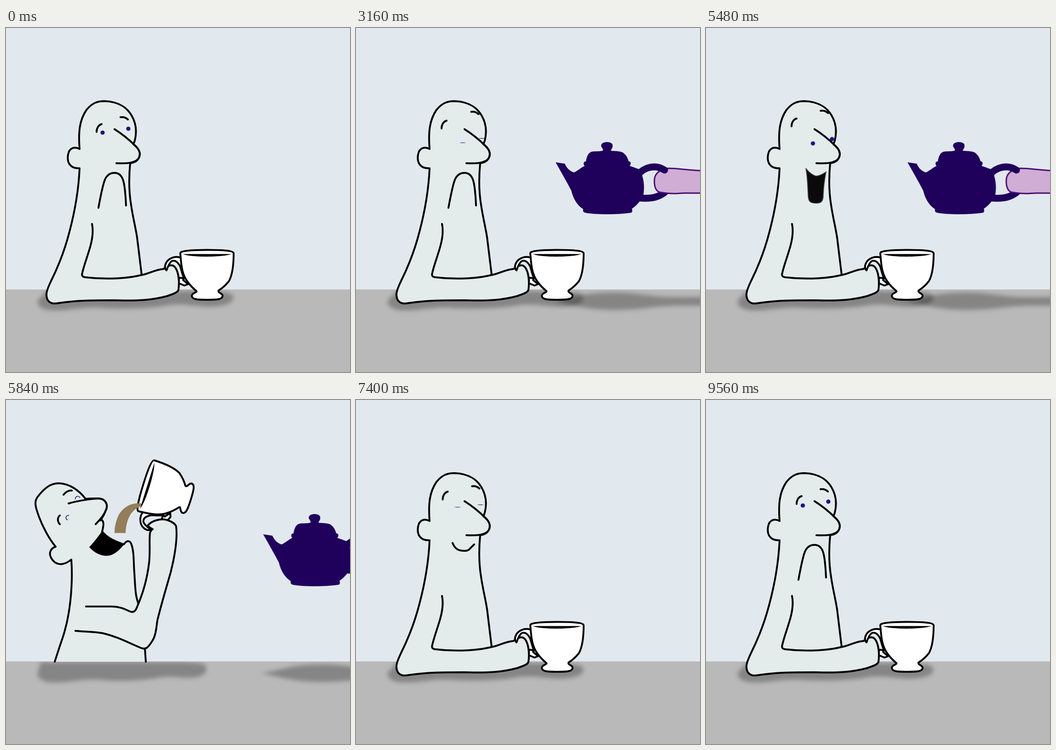
An HTML page for the animation above (9.6 s loop, 748x748 px).

```html
<!DOCTYPE html>
<html lang="en">
<head>
<meta charset="utf-8">
<title>A refill</title>
<style>
html, body { margin: 0; width: 100%; height: 100%; overflow: hidden; background: #e1e9ef; }
svg { display: block; width: 100vw; height: 100vh; }
svg * { animation-duration: 9.6s; animation-iteration-count: infinite; animation-timing-function: linear; }

.ink { fill: none; stroke: #000; stroke-width: 4; stroke-linecap: round; stroke-linejoin: round; }
.skin { fill: #e3ebeb; }
.white { fill: #fff; }
.shade { fill: #000; fill-opacity: .28; filter: blur(5px); }
.pot { fill: #1f005b; }
.grip { fill: none; stroke: #1f005b; stroke-width: 15; stroke-linecap: round; }
.tea { fill: #957c5a; }

/* Poses swap hard */
.sit { animation-name: sit; animation-timing-function: step-end; }
.drink { animation-name: drink; animation-timing-function: step-end; }
@keyframes sit { 0%, 71.66% { visibility: visible } 57.49% { visibility: hidden } }
@keyframes drink { 0%, 71.66% { visibility: hidden } 57.49% { visibility: visible } }

/* Eyes and brows */
.eye { fill: #1d0f80; transform-box: fill-box; transform-origin: center; animation-name: blink; animation-timing-function: step-end; }
@keyframes blink {
  0%, 6.24%, 11.66%, 26.24%, 33.74%, 75.41%, 79.16%, 81.66%, 95.8% { transform: none }
  5.41%, 10.83%, 24.16%, 32.91%, 74.99%, 77.08%, 80.83%, 95% { transform: scale(1.42, .15) }
  74.58%, 78.74% { transform: scale(1.2, .5) }
}
.lookL { animation-name: lookL; }
.lookR { animation-name: lookR; }
.browL { animation-name: browL; }
.browR { animation-name: browR; }
@keyframes lookL {
  0%, 17.92% { transform: none }
  20%, 33.7% { transform: translate(22px, 22px) }
  43%, 57.4% { transform: translate(22.5px, 23.5px) }
  57.5%, 90% { transform: translate(11px, 5.5px) }
  99.58% { transform: translate(.5px, 2px) }
  100% { transform: none }
}
@keyframes lookR {
  0%, 17.92% { transform: none }
  20%, 33.7% { transform: translate(7.5px, 21px) }
  43%, 57.4% { transform: translate(8px, 22.5px) }
  57.5%, 90% { transform: translate(4.5px, 9px) }
  99.58% { transform: translate(0, 2px) }
  100% { transform: none }
}
@keyframes browL {
  0%, 17.92%, 99%, 100% { transform: none }
  20%, 33.7% { transform: translate(-11px, -7.5px) }
  43%, 57.4% { transform: translate(-11px, -12.2px) }
  57.5%, 90% { transform: translate(-8.5px, -9.7px) }
}
@keyframes browR {
  0%, 17.92%, 99%, 100% { transform: none }
  20%, 33.7% { transform: translate(1.5px, -11.7px) }
  43%, 57.4% { transform: translate(.3px, -14px) }
  57.5%, 90% { transform: translate(3.3px, -6.5px) }
}

/* Mouth: frown, smile, laugh */
.lips { animation-name: lips, lipsShow; animation-timing-function: ease-in-out, step-end; }
@keyframes lips {
  0%, 33.75%, 99.6%, 100% { d: path("M201,391 C206,364 210,342 215,330 C220,318 228,315 236,315 C247,315 252,322 255,332 C259,346 260,364 261,386") }
  38.75%, 57.4% { d: path("M217,305 C220,309 222,311 225,314 C229,318 234,321 239,322 C244,322 248,321 252,319 C255,317 258,315 261,313") }
  57.5%, 80.8% { d: path("M210,311 C212,317 217,323 221,325 C225,327 231,328 236,328 C242,328 245,327 248,323 C251,320 254,317 257,314") }
  86.25%, 89.6% { d: path("M210,322 C213,323 217,324 221,325 C226,326 231,326 236,326 C241,326 245,325 248,324 C251,323 254,322 257,321") }
}
@keyframes lipsShow { 0%, 57.5% { opacity: 1 } 38.75% { opacity: 0 } }
.laugh { fill: #0a0a0a; stroke: #444; animation-name: laugh, laughShow; animation-timing-function: ease-out, step-end; }
@keyframes laugh {
  0%, 38.75% { stroke-width: 4; d: path("M217,305 C220,309 222,311 225,314 C229,318 234,321 239,322 C244,322 248,321 252,319 C255,317 258,315 261,313 C252,319 246,322 239,322 C232,320 224,314 217,305 Z") }
  44.1%, 100% { stroke-width: 1.6; d: path("M217,305 C221,325 221,345 222,362 C222,378 227,381 240,381 C253,381 255,374 255,362 C256,340 258,328 261,313 C252,319 246,322 239,322 C232,320 224,314 217,305 Z") }
}
@keyframes laughShow { 0%, 57.5% { opacity: 0 } 38.75% { opacity: 1 } }

/* Teapot, its arm and its shadow */
.slide { animation-name: slide; }
@keyframes slide {
  0% { transform: translateX(340px) }
  10.417% { transform: translateX(340px); animation-timing-function: cubic-bezier(.215, .61, .355, 1) }
  16.66% { transform: none }
  56.45% { transform: none; animation-timing-function: cubic-bezier(.55, .055, .675, .19) }
  62.7%, 100% { transform: translateX(340px) }
}
.tilt { transform-origin: 666.5px 331px; animation-name: tilt; animation-timing-function: ease-in-out; }
@keyframes tilt {
  0%, 37.5%, 56.25%, 100% { transform: translate(0, 0) rotate(0) }
  43.75%, 52.1% { transform: translate(-3px, -1px) rotate(-35.2deg) }
}
.arm { fill: #d0add5; stroke: #4a0a72; stroke-width: 3; animation-name: arm; animation-timing-function: ease-in-out; }
@keyframes arm {
  0%, 37.5%, 56.25%, 100% { d: path("M800,311 L748,310 C720,309 700,305 680,305 C660,306 650,318 649,328 C648,340 650,354 660,357 C672,359 680,360 690,360 C700,360 706,359 714,359 L748,359 L800,360 Z") }
  43.75%, 52.1% { d: path("M800,280 L748,281 C720,281 690,288 668,300 C656,307 647,325 646,332 C646,338 652,352 666,354 C680,356 682,352 690,345 C700,336 705,331 714,331 L748,332 L800,332 Z") }
}

/* Poured and drunk coffee */
.pour { animation-name: pour; }
@keyframes pour {
  0%, 43.3% { clip-path: inset(0 0 100% 0) }
  44.8%, 50.4% { clip-path: inset(0 0 0 0) }
  51.9%, 100% { clip-path: inset(100% 0 0 0) }
}
.wave { animation: wave .4s ease-in-out infinite alternate; animation-delay: -.32s; }
@keyframes wave {
  0%, 20% { d: path("M452,431 C444,431 442,438 442,445 C445,452 447,460 443,472 C440,480 439,486 438,498 L431,498 C431,490 429,481 432,473 C437,465 439,455 436,446 C436,436 440,428 449,428 Z") }
  100% { d: path("M452,431 C444,431 444,438 445,445 C442,452 440,460 441,472 C443,480 441,486 438,498 L431,498 C434,490 436,481 433,473 C433,465 434,455 438,446 C438,436 440,428 449,428 Z") }
}
.gulp { animation-name: gulp; }
@keyframes gulp {
  0%, 59.01% { clip-path: inset(0 0 100% 0) }
  62.2%, 63.4% { clip-path: inset(0 0 0 0) }
  66.6%, 100% { clip-path: inset(100% 0 0 0) }
}
.steam { fill: none; stroke: #333; stroke-dasharray: 12 8; animation-name: steam, steamShow; animation-timing-function: linear, step-end; }
@keyframes steam {
  0%, 43.9% { transform: translateY(10px); stroke-dashoffset: 8 }
  45% { transform: none; stroke-dashoffset: 0 }
  51.5%, 100% { transform: translateY(-55px); stroke-dashoffset: -40 }
}
@keyframes steamShow { 0%, 51.5% { opacity: 0 } 43.9% { opacity: 1 } }
</style>
</head>
<body>
<svg viewBox="0 0 748 748">
  <defs>
    <clipPath id="table"><path d="M0,568.5H748V748H0Z"/></clipPath>
    <g id="cup" class="ink">
      <path class="white" d="M376,543 L387,544 L385,548 L396,557 L388,560 L376,555 Z"/>
      <path d="M373,507 C380,514 380,528 387,544"/>
      <path class="white" d="M381,500 C367,494 352,502 348,511 C344,519 346,525 349,527 C352,519 354,512 360,507 C367,504 373,508 378,517 L383,522 Z"/>
      <path class="white" d="M379,490 C381,515 382,535 395,552 C402,562 408,567 414,572 C416,575 405,576 404,582 C404,590 415,591 437,591 C460,591 471,590 471,582 C470,576 460,576 462,571 C470,566 478,559 485,550 C493,535 495,515 495,490 C495,484 470,482.5 437,482.5 C400,482.5 378,485 379,490 Z"/>
      <path d="M385,491.5 C410,491.5 465,491.5 490,491.5 C470,499 400,499 385,491.5 Z" fill="#000" stroke="none"/>
    </g>
  </defs>

  <rect width="748" height="748" fill="#e1e9ef"/>
  <rect y="568.5" width="748" height="180" fill="#b9b9b9"/>

  <g class="sit">
    <g clip-path="url(#table)">
      <path class="shade" d="M69,592 C67,608 84,615 110,614 C140,614 160,607 200,608 C250,612 300,610 340,605 C380,597 400,604 440,606 C482,606 497,596 494,583 C490,574 470,572 380,572 L90,572 Z"/>
    </g>
    <path class="ink skin" d="M160,263 C157,225 160,200 175,178 C188,162 200,159 214,159 C245,160 262,172 273,190 C283,207 285,225 280,245 L277,253 L281,256 C292,266 293,276 288,284 C283,292 276,293 270,294 C267,325 267,355 272,385 C276,412 281,430 285,455 L295,537 C310,535 325,525 342,524 L352,518 Q364,512 370,524 C376,535 377,555 375,569 C374,574 368,577 350,583 C320,591 290,594 235,592 C190,592 155,592 115,598 C105,600 97,600 91,592 C84,580 90,567 98,550 C112,522 128,482 138,443 C152,390 158,350 160,305 C139,306 132,292 135,275 C138,259 150,258 160,263 Z"/>
    <path class="ink" d="M187,426 C190,440 189,455 183,476 C177,497 170,515 166,532 C164,539 166,541 172,542 C205,546 255,547 295,537"/>
    <g class="lookL"><circle class="eye" cx="210" cy="227.5" r="4.6"/></g>
    <g class="lookR"><circle class="eye" cx="266" cy="219" r="4.6"/></g>
    <path class="ink browL" d="M197,226 C197,218 201,211 208,209"/>
    <path class="ink browR" d="M249,194 C255,193 261,195 265,199"/>
    <path class="ink" d="M236,220 C255,232 268,243 281,256 C292,266 293,276 288,284 C280,294 262,295 240,294"/>
    <path class="ink lips" d="M201,391"/>
    <path class="laugh" d="M217,305"/>
    <use href="#cup"/>
  </g>

  <g class="drink">
    <g clip-path="url(#table)">
      <path class="shade" d="M69,592 C67,608 84,615 110,614 C140,614 160,607 200,608 C250,613 290,610 325,605 C350,598 375,605 405,604 C432,602 440,590 434,577 C428,570 400,572 380,570 L76,570 Z"/>
    </g>
    <path class="ink skin" stroke-linecap="butt" d="M106,569 L117,535 C124,515 131,495 136,465 C142,430 145,385 142,347 C122,363 106,358 98,343 C92,332 98,322 108,319 C96,305 78,275 68,243 C62,226 63,217 70,209 C85,190 98,181 115,181 C140,182 160,198 173,215 C185,214 195,214 201,214 C219,215 222,230 217,240 C213,251 208,258 205,262 C211,258 213,268 211,277 Q210,283 209,286 C222,302 240,308 256,314 C262,306 268,304 272,312 C279,330 277,350 279,375 C281,405 281,425 287,440 L302,540 L304,569"/>
    <path class="ink" d="M136,225 C155,219 185,215 201,214 C219,215 222,230 217,240 C212,252 205,260 195,270"/>
    <path d="M209,285 C200,298 190,310 181,320 C195,335 210,341 226,338 C240,334 250,322 257,314 C240,308 222,302 209,285 Z"/>
    <path class="ink" d="M125,206 C130,199 138,196 143,197 M117,270 C111,264 112,255 117,251"/>
    <path fill="none" stroke="#1d0f80" stroke-width="1.6" d="M137,251 A5 5 0 0 0 134,261 M151,216 A5 5 0 0 1 161,213"/>
    <use href="#cup" transform="translate(303.5 186) rotate(-72.7) translate(-437 -488)"/>
    <path class="ink skin" d="M174,449 L230,449 C250,449 262,457 270,460 C278,463 282,458 285,450 C296,425 306,395 311,355 C314,330 311,305 313,290 C314,284 317,282 319,281 C314,277 309,277 309,272 C318,262 335,258 347,260 C360,264 368,268 370,275 C373,300 368,335 358,375 C348,410 336,450 329,480 C326,505 324,515 318,524 C308,540 304,542 296,540 C270,530 245,515 210,507 C190,504 175,504 151,502"/>
    <path class="tea gulp" d="M294,225 C275,222 255,232 245,250 C238,265 236,278 236,289 C235,310 230,325 224,337 L238,334 C248,327 254,318 256,312 C259,303 260,297 260,289 C261,268 267,240 294,231 Z"/>
  </g>

  <g clip-path="url(#table)">
    <g class="slide">
      <path class="shade" d="M429,594 C465,590 490,575 560,575 C610,575 640,584 680,585 L820,585 L820,603 L690,604 C640,606 620,613 560,613 C490,612 465,600 429,594 Z"/>
    </g>
  </g>
  <g class="pour"><path class="tea wave" d="M452,431"/></g>
  <path class="steam" d="M391,396 C394,401 394,406 390,411 C386,416 382,415 380,413 C379,408 381,401 386,397"/>
  <g class="slide">
    <g class="tilt"><path class="grip" d="M612,369 C640,373 660,368 674,355"/></g>
    <path class="arm" d="M800,311"/>
    <g class="tilt">
      <path class="grip" d="M614,318 C626,304 650,295 671,309"/>
      <path class="pot" d="M434,292 L454,295 C458,304 464,311 474,314 C482,311 488,304 497,300 C494,296 494,290 500,290 C501,282 504,273 510,270 C516,267 528,269 536,267 C540,264 533,260 533,256 C533,250 540,248 546,248 C553,248 559,251 558,257 C558,263 553,264 555,267 C565,268 578,267 583,273 C590,279 591,285 593,290 C599,290 598,297 595,300 C605,303 613,306 617,308 C626,325 628,345 625,362 C622,372 612,385 600,393 C602,400 600,402 595,402 C570,406 520,406 500,402 C494,401 493,398 494,394 C480,385 472,370 468,353 C460,338 450,320 434,292 Z"/>
    </g>
  </g>
</svg>
</body>
</html>
```
